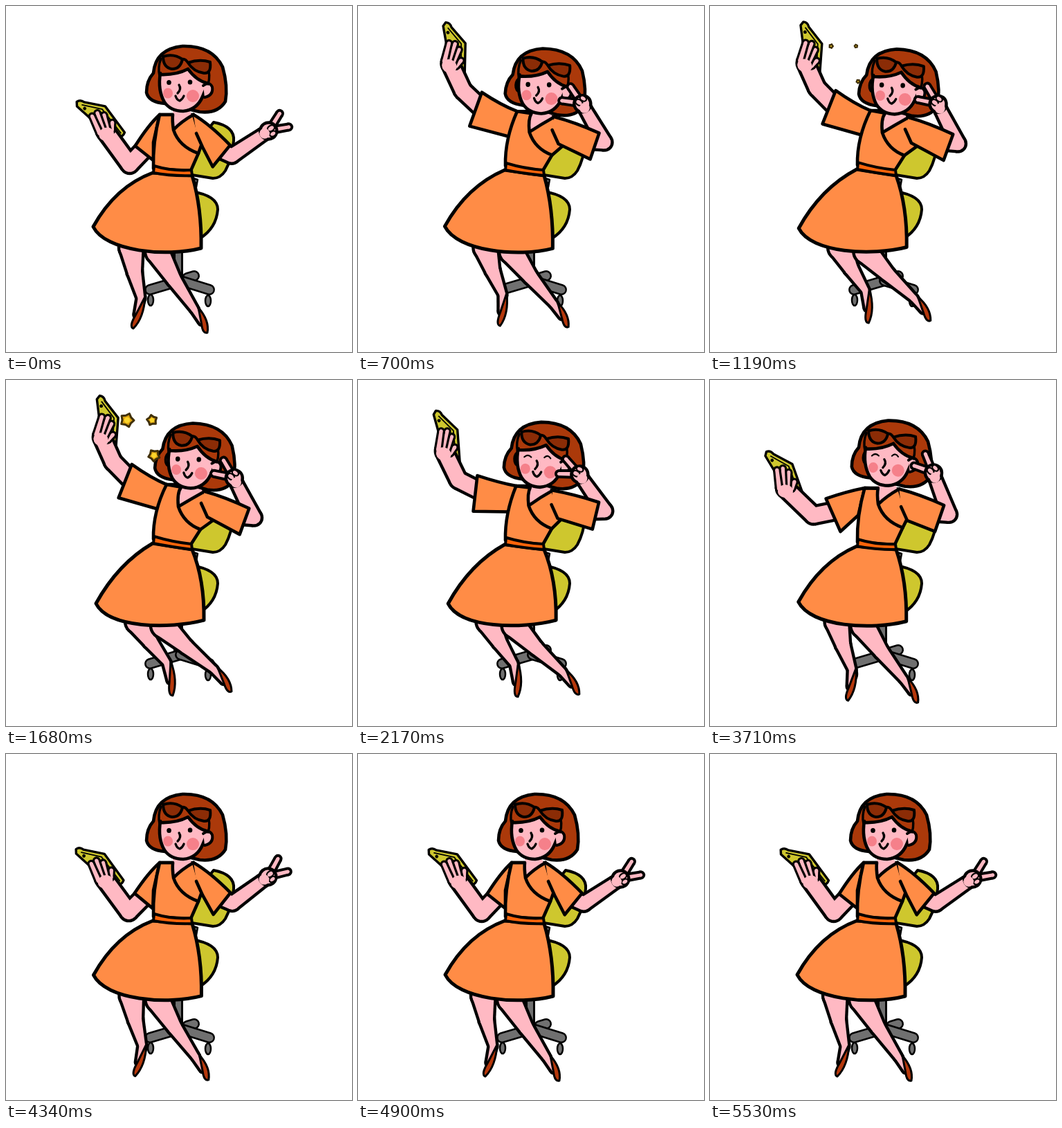
Write an HTML page with a canvas that moves like this. It is 500 px wide and 500 px high and loops after 5.6 s.

```html
<!DOCTYPE html>
<html lang="en">
<head>
<meta charset="utf-8">
<title>Selfie</title>
<style>
  html, body { margin: 0; width: 100%; height: 100%; overflow: hidden; background: #fff; }
  canvas { display: block; width: 100vmin; height: 100vmin; }
</style>
</head>
<body>
<canvas id="stage" width="500" height="500"></canvas>
<script>
const ctx = document.getElementById('stage').getContext('2d');
const LOOP = 5600, STEP = 70, RAD = Math.PI / 180;
const SKIN = '#ffb9c3', DRESS = '#ff8c46', BELT = '#fb640a', HAIR = '#ab390a',
      LENS = '#8b2c06', SHOE = '#b5380c', LIME = '#cec72e', GREY = '#707070', BLUSH = '#f5808a';

// Joint angles in degrees; lean runs from 0 to 1.
const rest   = { lean: 0,   lift: 121, fore: -126, tilt: 36, elbow: 47, bend: -34 };
const raise  = { lean: .8,  lift: 201, fore: -115, tilt: 74, elbow: 27, bend: -120 };
const selfie = { lean: 1,   lift: 203, fore: -114, tilt: 77, elbow: 28, bend: -117 };
const wink   = { lean: .3,  lift: 169, fore: -118, tilt: 60, elbow: 15, bend: -133 };
const lower  = { lean: .15, lift: 152, fore: -136, tilt: 53, elbow: 27, bend: -111 };
const keys = [[0, rest], [700, raise], [1260, selfie], [1820, selfie], [2520, wink],
              [3150, wink], [3640, lower], [3780, lower], [4410, rest], [LOOP, rest]];

const mix = (a, b, k) => a + (b - a) * k;
const ease = k => k * k * (3 - 2 * k);
const clamp = k => Math.max(0, Math.min(1, k));
const between = (p, q, k) => [mix(p[0], q[0], k), mix(p[1], q[1], k)];
const polar = ([x, y], degrees, r) =>
  [x + r * Math.cos(degrees * RAD), y + r * Math.sin(degrees * RAD)];

function poseAt(t) {
  const i = keys.findIndex(key => key[0] > t);
  const [t0, from] = keys[i - 1], [t1, to] = keys[i], k = ease((t - t0) / (t1 - t0));
  const pose = {};
  for (const name in from) pose[name] = mix(from[name], to[name], k);
  return pose;
}

const swayAt = t => t < 1680 ? ease(t / 1680) : clamp((4480 - t) / 2800);

function shape(d, fill, width = 4.6, stroke = '#000') {
  const path = new Path2D(d);
  if (fill) { ctx.fillStyle = fill; ctx.fill(path); }
  if (width) { ctx.lineWidth = width; ctx.strokeStyle = stroke; ctx.stroke(path); }
}

function oval(x, y, rx, ry, fill, width = 0) {
  ctx.beginPath();
  ctx.ellipse(x, y, rx, ry, 0, 0, 7);
  ctx.fillStyle = fill;
  ctx.fill();
  if (width) { ctx.lineWidth = width; ctx.strokeStyle = '#000'; ctx.stroke(); }
}

// Tapered, outlined limb through [x, y, radius] joints.
function limb(joints, line = 2.2) {
  for (const [grow, color] of [[line, '#000'], [-line, SKIN]]) {
    joints.forEach(([x, y, r], i) => {
      oval(x, y, r + grow, r + grow, color);
      if (!i) return;
      const [px, py, pr] = joints[i - 1], a = Math.atan2(y - py, x - px);
      const nx = -Math.sin(a), ny = Math.cos(a), p = pr + grow, q = r + grow;
      ctx.beginPath();
      ctx.moveTo(px + nx * p, py + ny * p);
      ctx.lineTo(x + nx * q, y + ny * q);
      ctx.lineTo(x - nx * q, y - ny * q);
      ctx.lineTo(px - nx * p, py - ny * p);
      ctx.fill();
    });
  }
}

function placed([x, y], degrees, draw) {
  ctx.save();
  ctx.translate(x, y);
  ctx.rotate(degrees * RAD);
  draw();
  ctx.restore();
}

function chair() {
  shape('M249 350V396', null, 14);
  shape('M249 350V396', null, 8, GREY);
  for (const d of ['M262 393L272 390', 'M208 410L252 397', 'M252 397L294 410']) {
    shape(d, null, 16);
    shape(d, null, 11, GREY);
  }
  oval(209, 425, 4, 8, GREY, 2.5);
  oval(292, 426, 4, 8, GREY, 2.5);
  shape('M268 248L277 251L275 262L268 264M268 254L276 256M268 259L275 261', GREY, 2.4);
  shape('M300 168Q331 174 329 195Q326 222 317 238Q310 249 299 249L262 243L275 200Z', LIME, 4);
  shape('M268 268Q306 274 306 294Q304 321 280 336Z', LIME, 4);
}

function leg(hip, ankle, toe) {
  const knee = between(hip, ankle, .48);
  limb([[...hip, 18], [knee[0] - 2, knee[1], 11.5], [...ankle, 6.5],
        [...between(ankle, toe, .55), 4.5]]);
  const [x, y] = [ankle[0] + 6, ankle[1] - 2], [tx, ty] = toe;
  const n = 9 / Math.hypot(tx - x, ty - y), nx = -(ty - y) * n, ny = (tx - x) * n;
  const [mx, my] = between([x, y], toe, .6);
  shape(`M${x} ${y}Q${mx - nx} ${my - ny} ${tx} ${ty}Q${tx + nx * .8} ${ty + ny * .8}
    ${mx + nx * .4} ${my + ny * .4}Z`, SHOE, 3);
}

function legs(s) {
  leg([181 + 9 * s, 349], [195 + 37 * s, 422 - 14 * s], [184 + 57 * s, 466 - 10 * s]);
  leg([219 + 8 * s, 355], [272 + 28 * s, 438 - 20 * s], [291 + 35 * s, 472 - 22 * s]);
}

function skirt(waist, shift) {
  const lx = 126 + shift, ly = 319 + shift, rx = 282 + shift, ry = 350 - shift * .7;
  shape(`M212 ${waist}Q${lx + 32} ${ly - 58} ${lx} ${ly}C${lx + 18} ${ly + 36}
    ${rx - 50} ${ry + 13} ${rx} ${ry}Q${rx + 1} ${ry - 58} 269 245Z`, DRESS, 5);
}

function torso([lx, ly], [rx, ry], waist, lean) {
  const cx = 241 + 12 * lean, cy = 157 - 2 * lean, vx = 242 + 7 * lean, vy = 179 + 4 * lean;
  const ex = 278 + 3 * lean, ey = 213 + 3 * lean;
  shape(`M${lx} ${ly}Q212 ${ly + 40} 213 ${waist - 6}L267 238L${ex} ${ey}
    L${rx + 12} ${ry + 42}L${rx} ${ry}Z`, DRESS);
  shape(`M${cx} ${cy - 10}V${cy}Q${vx} ${cy + 8} ${vx} ${vy}
    Q${rx - 18} ${ry + 12} ${rx - 3} ${ry}L${rx - 8} ${ry - 12}Z`, SKIN, 0);
  shape(`M${lx} ${ly}H${cx}M${cx} ${cy}Q${vx - 2} ${cy + 8} ${vx} ${vy}
    Q${vx + 8} ${vy + 24} ${ex} ${ey}M${rx} ${ry}Q${rx - 18} ${ry + 10} ${vx} ${vy}`);
  shape(`M214 ${waist - 10}Q240 ${waist - 2} 268 237L269 245Q238 ${waist + 5} 213 ${waist}Z`, BELT, 4);
}

function head(closed, lean) {
  const ear = 227 - 4 * clamp(lean * 4);
  shape(`M203 125Q203 108 213 97Q216 62 255 58Q298 57 313 88Q321 116 317 138
    Q306 156 280 153L230 141Q206 139 203 125Z`, HAIR);
  oval(ear, 112, 5, 9, SKIN, 4);
  shape(`M223 97Q219 122 229 139Q238 152 256 152Q276 150 284 131L292 112
    Q275 108 263 91Q246 100 223 99Z`, SKIN);
  shape('M285 115Q294 108 298 117Q300 129 287 132', SKIN, 4);
  shape('M224 76Q219 88 222 102M291 88Q296 100 292 113', null, 3.4);
  shape('M227 73Q242 68 255 77Q252 91 240 91Q227 89 227 73Z', LENS, 4);
  shape('M263 82Q280 76 295 81Q297 98 286 97Q271 95 263 82ZM255 77Q259 76 263 82', LENS, 4);
  oval(234, 126, 7, 7.5, BLUSH);
  oval(270, 130, 9, 9, BLUSH);
  if (closed) shape('M232 109Q237 104 242 109M261 109Q266 104 270 110', null, 2.2);
  else {
    oval(235.5, 110.5, 3.3, 3.6, '#000');
    oval(266, 110, 3.3, 3.6, '#000');
  }
  shape('M250 114Q254 120 248 126M245 130Q247 136 251 137Q255 135 257 130', null, 3.3);
}

// Both sleeves flare the same way; side is 1 for left, -1 for right.
function sleeve(shoulder, armpit, angle, length, half, side) {
  const center = polar(shoulder, angle, length);
  const outer = polar(center, angle + 107 * side, half);
  const inner = polar(center, angle + 107 * side, -half);
  const bend = [mix(shoulder[0], outer[0], .45), mix(shoulder[1], outer[1], .32)];
  const inside = [armpit[0] - 9, armpit[1] - 20];
  return {
    start: between(center, shoulder, .18),
    draw: () => shape(`M${shoulder}Q${bend} ${outer}L${inner}L${armpit}` +
      (side < 0 ? `L${inside}` : `L${shoulder}`), DRESS)
  };
}

function phone() {
  shape('M0 0Q2 -6 9 -6L37 -19L82 -5Q84 2 79 4L33 8L4 5Z', LIME, 3.4);
  shape('M9 -1L36 -13L78 -1', null, 1.8);
  oval(15, 1, 2.4, 2.4, '#000');
}

function leftArm(shoulder, { lean, lift, fore, tilt }) {
  const angle = 4 + .89 * lift;
  const cuff = sleeve(shoulder, [213 + 8 * lean, 197 - 10 * lean], angle, 60,
    Math.min(26, 17 + (angle - 112) * .4), 1);
  const elbow = polar(shoulder, lift, 84), palm = polar(elbow, fore, 59 - 20 * lean);
  const corner = polar(polar(palm, tilt, -59), tilt + 90, -10);
  placed(corner, tilt, phone);
  limb([[...cuff.start, 13], [...elbow, 13], [...palm, 13]]);
  placed(palm, tilt - 142, () => {
    for (let i = 1.5; i >= -1.5; i--)
      limb([[0, i * 6, 4.8], [29 - 4 * (i + .7) ** 2, i * 8.5, 4.2]], 1.6);
    ctx.beginPath();
    ctx.ellipse(-4, 0, 9.5, 11, 0, 0, 7);
    ctx.fillStyle = SKIN;
    ctx.fill();
  });
  cuff.draw();
}

function rightArm(shoulder, { lean, elbow, bend }) {
  const cuff = sleeve(shoulder, [284 + 7 * lean, 204 - 6 * lean], elbow + 9, 72, 20, -1);
  const joint = polar(shoulder, elbow, 81), palm = polar(joint, bend, 65);
  limb([[...cuff.start, 12], [...joint, 11.5], [...between(joint, palm, .85), 9.5]]);
  cuff.draw();
  placed(palm, bend + (bend + 34) * .33, () => {
    for (const turn of [24, -24]) {
      const tip = polar([0, 0], turn, 29);
      limb([[0, 0, 5], [...tip, 4.5]], 2);
    }
    limb([[-1, 0, 12]]);
    oval(4, -1, 5.5, 4, SKIN, 2.2);
    oval(2, 7, 5, 3.6, SKIN, 2.2);
  });
  oval(...between(joint, palm, .88), 7.4, 7.4, SKIN);
}

function star(x, y, r, turn) {
  placed([x, y], turn, () => {
    const points = Array.from({ length: 10 }, (_, i) => polar([0, 0], i * 36 - 90, i % 2 ? r * .7 : r));
    shape(`M${points.join('L')}Z`, '#dda412', 3, '#40300a');
    oval(0, 0, r * .42, r * .42, '#fbd52c');
  });
}

function draw(t) {
  const pose = poseAt(t), sway = swayAt(t), { lean } = pose, waist = 241 - 5 * lean;
  const left = [222 + 10 * lean, 157 - 6 * lean], right = [271 + 16 * lean, 157 + 4 * lean];
  ctx.clearRect(0, 0, 500, 500);
  ctx.lineJoin = ctx.lineCap = 'round';

  chair();
  legs(sway);
  skirt(waist, 9 * sway - 5 * lean);
  leftArm(left, pose);
  torso(left, right, waist, lean);
  placed([258 + 11 * lean, 150 + 4.5 * lean], 2.5 * lean, () => {
    ctx.translate(-258, -150);
    head(t >= 2170 && t < 3990, lean);
  });
  if (t >= 1190 && t < 1890) {
    const size = Math.min(1, (t - 1120) / 280, (1960 - t) / 210);
    star(175, 58, 10 * size, 20);
    star(211, 58, 7.5 * size, -10);
    star(214, 109, 8.5 * size, 40);
  }
  rightArm(right, pose);
}

function tick() {
  draw(Math.floor(performance.now() % LOOP / STEP) * STEP);
  requestAnimationFrame(tick);
}
tick();
</script>
</body>
</html>
```
